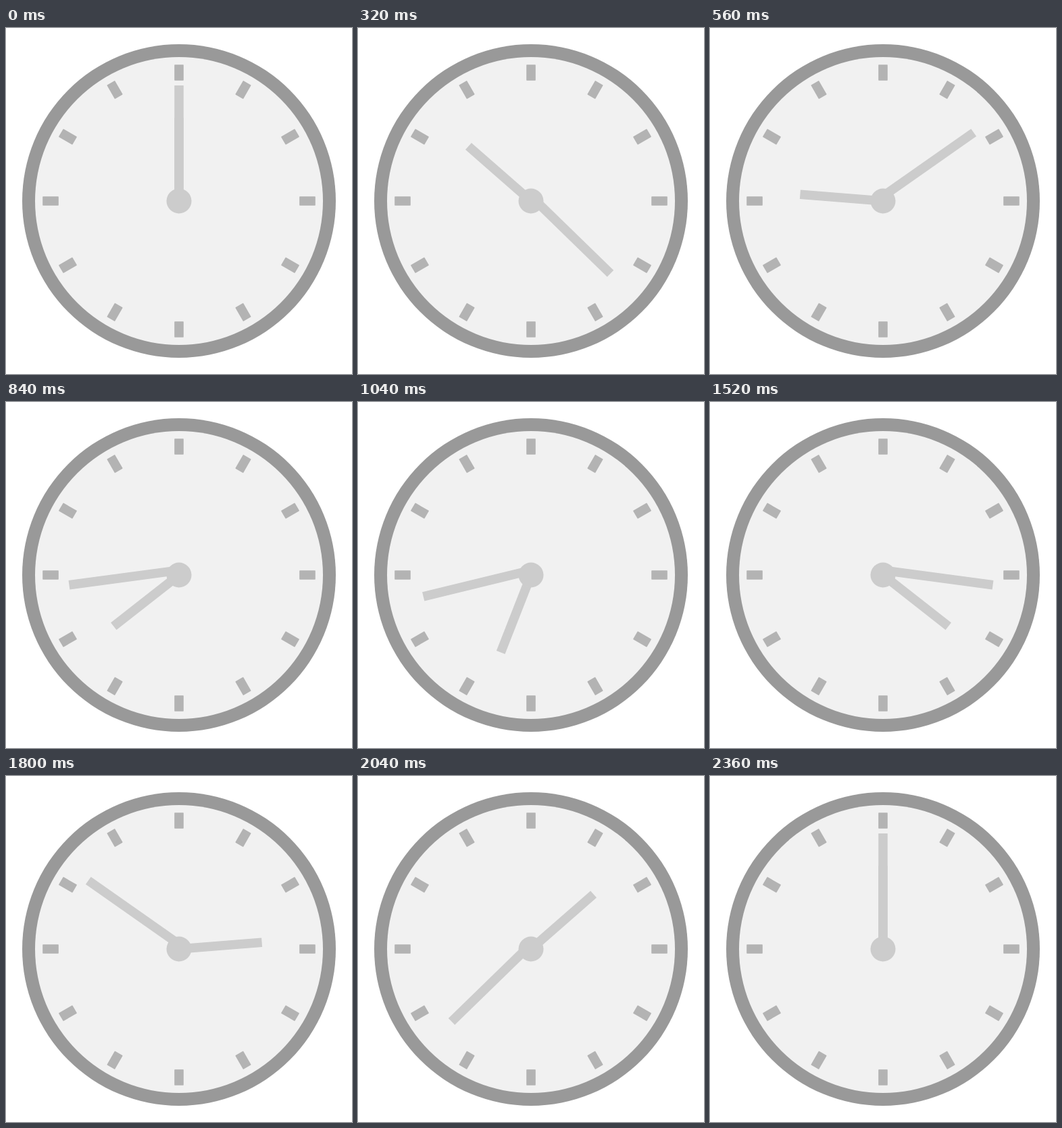
An HTML page for the animation above (2400 ms loop, 512 by 512 pixels).

```html
<!DOCTYPE html>
<html lang="en">
<head>
<meta charset="utf-8">
<title>Clock</title>
<style>
  html, body { margin: 0; width: 100%; height: 100%; overflow: hidden; background: #fff; }
  svg { display: block; width: 100%; height: 100%; }
</style>
</head>
<body>
<svg viewBox="0 0 512 512">
  <circle cx="256" cy="256" r="232" fill="#999"/>
  <circle cx="256" cy="256" r="213" fill="#f1f1f1"/>
  <g id="ticks" fill="#b3b3b3"></g>
  <g fill="#ccc">
    <rect id="hour" x="249.2" y="133" width="13.6" height="123"/>
    <rect id="minute" x="249.2" y="85" width="13.6" height="164"/>
    <circle cx="256" cy="256" r="18.5"/>
  </g>
</svg>
<script>
const LOOP = 2400, STEP = 40, LAST = LOOP / STEP - 1;
const get = id => document.getElementById(id);
const rotate = (el, degrees, cy) => el.setAttribute('transform', `rotate(${degrees} 256 ${cy})`);

const shape = { x: 249.2, y: 54.2, width: 13.6, height: 23.6, rx: 0.8 };
for (let i = 0; i < 12; i++) {
  const tick = document.createElementNS('http://www.w3.org/2000/svg', 'rect');
  for (const key in shape) tick.setAttribute(key, shape[key]);
  rotate(tick, i * 30, 256);
  get('ticks').append(tick);
}

const hour = get('hour'), minute = get('minute');

// Time runs backwards: one hour-hand turn, twelve minute-hand turns.
// The minute hand pivots slightly above the hub.
function draw() {
  const turn = -360 * Math.floor(performance.now() % LOOP / STEP) / LAST;
  rotate(hour, turn, 256);
  rotate(minute, turn * 12, 249);
  requestAnimationFrame(draw);
}
draw();
</script>
</body>
</html>
```
